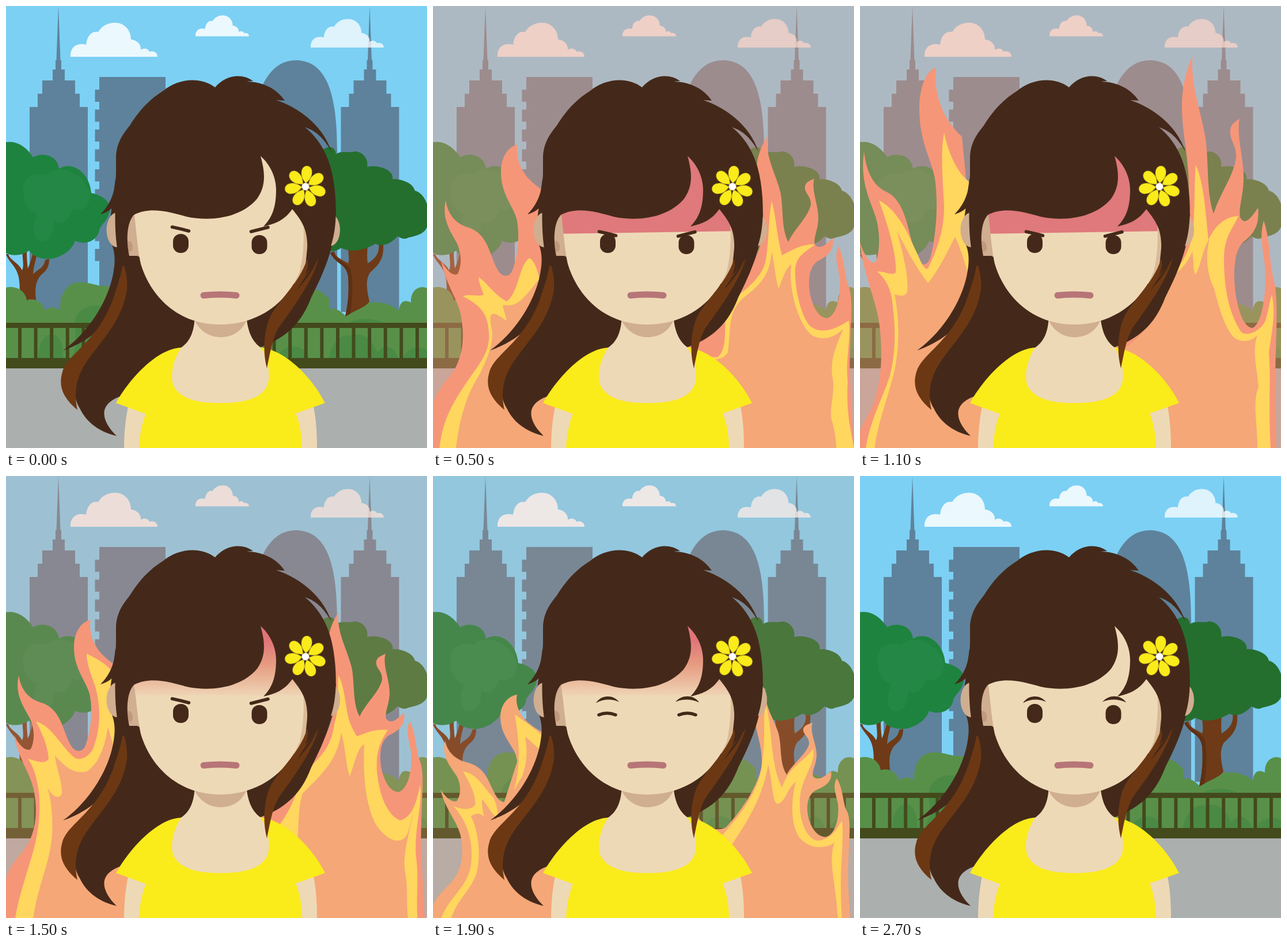
An HTML page without scripts for the animation above (3200 ms loop, 731 by 766 pixels).

```html
<!DOCTYPE html>
<html lang="en">
<head>
<meta charset="utf-8">
<title>Cooling down</title>
<style>
html, body { margin: 0; width: 100%; height: 100%; overflow: hidden; }
svg { display: block; width: 100vw; height: 100vh; }

.hair { fill: #44291a; }
.lock { fill: #6c3813; }
.skin { fill: #eed9b7; }
.shade { fill: #d0ae90; }
.wear { fill: #faeb1b; }
.town { fill: #5e829b; }
.bush { fill: #599049; }
.deep { fill: #4a8a45; }
.rail { fill: #434a1c; }
.wood { fill: #6e3a17; }
.fire { fill: #f69678; }
.y { fill: #ffd65e; }
.o { fill: #f5a777; }
.line { fill: none; stroke: #44291a; stroke-width: 5.5; stroke-linecap: round; }

/* each flame pose shows for 200 ms, starting at --t */
.pose { animation: pose 3.2s step-end infinite; animation-delay: calc(var(--t) * 1ms - 3200ms); }
.tint, .flush, .glow, .frown, .calm, .open, .shut, .lips, .sigh { animation: 3.2s step-end infinite; }
.tint { animation-name: tint; }
.flush { animation-name: flush; }
.glow { animation-name: glow; }
.frown { animation-name: frown; }
.calm { animation-name: calm; }
.open { animation-name: open; }
.shut { animation-name: shut; }
.lips { animation-name: lips; }
.sigh { animation-name: sigh; }

@keyframes pose { 0% { visibility: visible } 6.25%, 100% { visibility: hidden } }
@keyframes tint {
  0% { opacity: 0 } 15.625% { opacity: .42 } 46.875% { opacity: .284 }
  59.375% { opacity: .18 } 71.875% { opacity: .095 } 84.375%, 100% { opacity: 0 }
}
@keyframes flush { 0% { opacity: 0 } 15.625% { opacity: 1 } 46.875%, 100% { opacity: 0 } }
@keyframes glow {
  0% { opacity: 0; transform: none }
  46.875% { opacity: 1; transform: none }
  65.625% { opacity: 1; transform: translateY(-10px) }
  71.875% { opacity: 1; transform: translateY(-22px) }
  78.125% { opacity: 1; transform: translateY(-45px) }
  84.375%, 100% { opacity: 0; transform: none }
}
@keyframes frown {
  0% { opacity: 1; transform: none }
  6.25% { opacity: 1; transform: translateY(4px) }
  9.375% { opacity: 1; transform: translateY(8px) }
  46.875% { opacity: 1; transform: translateY(3px) }
  59.375%, 100% { opacity: 0; transform: none }
}
@keyframes calm { 0% { opacity: 0 } 59.375%, 100% { opacity: 1 } }
@keyframes open { 0% { opacity: 1 } 59.375% { opacity: 0 } 84.375%, 100% { opacity: 1 } }
@keyframes shut { 0% { opacity: 0 } 59.375% { opacity: 1 } 84.375%, 100% { opacity: 0 } }
@keyframes lips { 0% { opacity: 1 } 71.875% { opacity: 0 } 84.375%, 100% { opacity: 1 } }
@keyframes sigh { 0% { opacity: 0 } 71.875% { opacity: 1 } 84.375%, 100% { opacity: 0 } }
</style>
</head>
<body>
<svg viewBox="0 0 731 766" preserveAspectRatio="none">
<defs>
  <path id="cloud" fill="#fff" d="M112 88C111 72 122 63 139 67C141 50 150 43 160 45C167 34 177 29 189 29C206 29 217 42 217 58C228 59 235 67 234 76C240 72 247 74 249 79C257 77 263 81 263 88Z"/>
  <path id="tower" d="M91 0L94.500 94H96V110H102V129H120V152H128V175H142V530H41V175H55V152H63V129H81V110H86V94H87.500Z"/>
  <path id="petal" d="M0-6C-6-12-10-18-9-27C-7-39 7-39 9-27C10-18 6-12 0-6Z"/>
  <pattern id="posts" x="21" width="27.600" height="60" patternUnits="userSpaceOnUse"><rect class="rail" width="6" height="60"/></pattern>
  <linearGradient id="heat" gradientUnits="userSpaceOnUse" x1="0" x2="0" y1="285" y2="380">
    <stop stop-color="#e17579"/><stop offset=".42" stop-color="#e69a80"/><stop offset="1" stop-color="#eed4b4"/>
  </linearGradient>
  <path id="face" d="M222 250V355C227 395 229 425 234 447C250 500 295 552 372 552C440 552 490 512 510 460C517 430 518 400 516 372L500 345V250Z"/>
  <clipPath id="mask"><use href="#face"/></clipPath>

  <!-- flame outlines, left and right -->
  <path id="l" d="M0 790V690C8 660 30 645 40 625C52 600 54 575 50 545C46 510 22 485 14 440C22 458 36 470 43 464C50 450 50 430 42 412C30 390 15 370 22 337C26 362 40 378 62 384C95 395 98 430 111 455C118 470 132 472 138 458C148 430 151 395 145 368C138 345 118 325 118 288C118 262 130 244 147 240C143 262 152 282 164 297C175 308 182 314 192 320L260 790Z"/>
  <path id="r" d="M380 790V560L460 495C470 510 490 535 512 520C535 490 565 440 573 395C578 350 561 320 562 280C563 258 572 240 580 226C577 262 595 290 603 322C609 350 604 385 617 409C628 385 650 368 656 345C657 328 644 325 646 312C648 304 655 303 662 299C656 320 670 345 669 370C668 390 660 402 663 413C672 425 686 410 694 402C698 425 682 435 668 442C652 452 650 480 656 505C662 527 672 541 685 541C702 535 709 500 706 470C703 450 696 435 704 417C716 440 714 470 722 487C730 510 725 545 724 600C722 650 728 700 731 790Z"/>

  <g id="A">
    <use href="#l"/><use href="#r"/>
    <path class="y" d="M10 790C10 720 40 680 60 650C80 620 100 600 97 565C95 535 85 520 52 503C65 498 80 505 88 500C84 490 80 480 79 470C95 480 105 500 128 512C150 495 150 445 168 437C180 445 185 470 190 500L250 790Z"/>
    <path class="o" d="M38 790C42 720 60 670 80 640C95 610 103 590 103 565C95 530 100 525 128 546C125 530 120 522 122 518C150 525 165 495 183 475L260 790Z"/>
    <path class="y" d="M440 790V590C460 600 480 612 495 608C515 590 502 540 512 520C525 500 570 480 578 440C584 400 582 370 588 338C596 365 596 395 606 432C620 425 640 412 663 413C650 425 632 430 629 455C627 490 640 540 655 555C675 570 700 560 722 545C726 580 716 610 720 650C718 700 722 720 731 766V790Z"/>
    <path class="o" d="M440 790V600C470 612 500 620 512 600C518 560 510 530 540 505C565 485 585 470 588 425C592 440 595 475 600 490C608 470 612 455 622 448C616 500 640 560 660 572C685 582 700 570 712 560C700 590 690 610 693 640C700 670 686 700 693 720C700 745 700 760 702 790Z"/>
  </g>
  <g id="B">
    <use href="#l" transform="translate(-15 -253.500) scale(1 1.5)"/>
    <use href="#r" transform="translate(-3 -253.500) scale(1 1.5)"/>
    <path class="y" d="M8 780C15 720 40 680 52 640C65 590 60 540 55 505C50 480 40 470 30 460C45 460 55 468 62 462C65 430 45 370 33 337C60 350 80 385 95 420C105 440 110 458 118 455C135 420 150 380 145 330C143 290 140 250 146 220C155 260 170 290 190 305L260 780Z"/>
    <path class="o" d="M24 780C28 730 45 690 58 640C70 590 68 540 60 500C70 502 78 505 82 495C85 470 75 430 64 390C80 420 95 450 118 480C135 460 150 430 165 400C175 420 180 440 190 470L260 780Z"/>
    <path class="y" d="M480 780L500 600L545 462C560 445 575 420 578 390C582 350 580 310 583 275C598 310 600 360 605 405C615 385 630 365 657 364C645 390 632 400 632 440C632 500 645 540 662 565C675 575 698 560 704 545C710 525 712 510 715 500C722 530 716 560 710 600C714 650 708 700 714 780Z"/>
    <path class="o" d="M440 780V600C490 590 520 520 543 468C560 455 572 440 577 425C580 440 578 462 583 465C592 450 595 420 607 403C598 440 605 470 615 490C625 530 635 560 650 575C665 585 682 580 690 570C680 600 690 630 692 660C680 690 692 730 690 780Z"/>
  </g>
  <g id="C">
    <use href="#l" y="9"/>
    <use href="#r" transform="translate(-3 12) scale(1 .99)"/>
    <path class="y" d="M14 780C20 730 40 680 50 640C60 600 60 560 55 535C50 510 45 500 38 490C55 495 68 500 74 490C72 465 62 445 52 425C80 435 90 460 115 485C125 495 140 490 150 475C165 440 165 400 155 365C148 345 140 325 140 308C155 315 175 325 190 345L260 780Z"/>
    <path class="o" d="M46 780C50 720 78 670 80 620C82 590 78 560 72 540C80 555 92 562 97 550C98 530 88 510 85 485C100 500 115 518 140 512C160 500 172 470 177 435L190 480L260 780Z"/>
    <path class="y" d="M440 780V640C490 600 500 560 520 510C545 490 565 470 570 430C580 400 575 370 577 345C590 370 588 400 598 430C605 445 610 455 612 450C625 445 640 438 663 440C650 460 640 480 645 520C650 560 665 590 685 597C705 590 712 570 719 535C724 570 708 610 712 660C718 700 710 740 716 780Z"/>
    <path class="o" d="M440 780V640L503 660C510 620 505 580 515 550C545 520 575 495 582 445C590 470 590 505 597 520C605 500 610 470 622 465C620 510 622 560 640 600C655 625 675 637 688 630C700 625 702 600 708 580C700 620 690 650 692 680C700 720 693 740 700 780Z"/>
  </g>
  <g id="D">
    <use href="#l" transform="translate(-1 182) scale(1 .82)"/>
    <use href="#r" transform="translate(-3 182) scale(1 .82)"/>
    <path class="o" d="M28 780C80 700 80 640 70 588L114 595L160 452L250 780ZM500 780L518 640L582 500L597 568L630 530C620 600 640 650 697 635L705 780Z"/>
    <path class="y" d="M10 780C20 735 55 720 65 680C72 640 62 600 35 572C50 578 65 580 73 570C75 550 62 530 52 512C75 515 85 535 100 552C110 560 112 580 114 595C100 585 95 570 85 560C85 575 88 590 90 592C82 582 72 585 66 590C82 620 82 670 75 690C65 720 35 740 28 780ZM142 413C165 430 180 440 190 450V478C175 465 165 455 160 452C165 480 162 500 155 520L140 545C155 500 148 450 142 413Z"/>
    <path class="y" d="M578 395C590 440 585 500 606 540C620 500 640 500 660 473C665 500 640 520 637 560C635 600 650 630 668 632C690 630 700 615 710 597C715 640 703 680 711 780H704C700 700 685 670 697 635C685 645 655 650 635 625C620 600 622 560 630 530C615 540 612 568 597 568C588 560 590 530 582 500C575 540 560 580 518 640L500 625C540 580 570 540 572 490C578 450 572 420 578 395Z"/>
  </g>
</defs>

<!-- park -->
<rect width="731" height="766" fill="#7cd0f4"/>
<g class="town">
  <use href="#tower"/><use href="#tower" x="540.500"/>
  <path d="M162 123H277V530H162ZM430 530V190C440 130 465 94 503 94C560 94 575 160 575 250V530Z"/>
  <path d="M158.500 145V443" stroke="#5e829b" stroke-width="8" stroke-dasharray="21 13.500"/>
</g>
<use href="#cloud" opacity=".85"/>
<use href="#cloud" opacity=".85" transform="translate(260 -1.700) scale(.616)"/>
<use href="#cloud" opacity=".75" transform="translate(435 -1.900) scale(.84)"/>
<path class="wood" d="M0 430C5 445 18 450 22 470C26 490 22 510 20 520H54C50 500 50 485 55 475C62 460 75 462 75 438L68 440C66 455 52 458 47 465C48 450 53 435 56 424L50 418C45 435 42 445 38 455C36 440 36 430 36 416H28C28 436 32 450 28 458C22 445 6 440 4 430Z"/>
<path fill="#1e833f" d="M0 236C17 233 35 243 47 262C65 252 90 260 92 282C115 268 145 288 148 324C168 328 183 340 180 354C178 372 165 378 162 388C160 405 140 416 120 407C115 425 88 441 68 438C55 437 46 432 40 424C27 434 8 433 0 428Z"/>
<path fill="#258746" d="M30 320C28 298 50 285 70 293C90 270 138 290 146 326C146 348 130 358 115 352C108 375 92 380 84 372C84 400 70 412 56 406C42 395 50 375 54 360C38 356 30 340 30 320Z"/>
<path class="bush" d="M0 488C18 484 34 494 36 510C50 505 64 513 68 528C75 520 88 522 94 528C92 498 108 479 127 479C148 478 160 487 172 485L250 500H480C500 484 540 480 561 508V525C570 522 582 528 590 538C598 524 615 514 632 514C652 512 672 518 682 528C684 512 692 508 703 514C702 492 718 483 731 489V620H0Z"/>
<path class="wood" d="M563 428C575 450 590 445 594 468C596 495 594 515 589 538C605 528 625 522 631 512C626 490 624 475 632 462C645 450 657 440 655 413H647C650 432 635 442 628 446C626 432 628 420 628 410H593C594 425 597 440 594 446C585 440 572 436 570 425Z"/>
<path fill="#5e3014" d="M563 428C575 450 590 445 594 468C596 495 594 515 589 538L598 533C602 505 603 475 598 455C590 445 572 440 567 426Z"/>
<path fill="#246f2e" d="M540 260C555 238 572 242 573 257C582 249 598 256 605 252C620 252 630 266 627 279C645 274 675 284 671 300C685 299 707 306 710 320C722 323 731 337 733 352V375C731 396 712 398 697 402C692 405 686 403 680 399C668 412 655 418 641 412C622 424 598 428 582 419C574 426 562 427 540 420Z"/>
<g class="deep">
  <path d="M119 550C120 528 145 512 172 522V612H125ZM57 612C55 585 66 568 80 569C95 570 100 590 99 612ZM115 612C118 582 135 572 155 578V612ZM470 612C480 580 522 585 526 612ZM560 612C565 580 585 566 600 572C625 560 640 590 645 600C658 582 678 592 680 612ZM688 612C695 592 715 588 731 596V612ZM596 549C606 540 640 540 655 549Z"/>
</g>
<rect y="628" width="731" height="138" fill="#abafae"/>
<rect class="rail" y="549" width="731" height="9"/>
<rect class="rail" y="610" width="731" height="18"/>
<rect y="556" width="731" height="56" fill="url(#posts)"/>
<rect class="tint" width="731" height="766" fill="#f0997d"/>

<!-- flames -->
<g class="fire">
  <g class="pose" style="--t:500"><use href="#A"/></g>
  <g class="pose" style="--t:700"><use href="#B"/></g>
  <g class="pose" style="--t:900"><use href="#A" transform="translate(0 -257) scale(1 1.5)"/></g>
  <g class="pose" style="--t:1100"><use href="#B"/></g>
  <g class="pose" style="--t:1300"><use href="#A" transform="translate(0 -257) scale(1 1.5)"/></g>
  <g class="pose" style="--t:1500"><use href="#C"/></g>
  <g class="pose" style="--t:1700"><use href="#A" y="7"/></g>
  <g class="pose" style="--t:1900" fill="#f5a777"><use href="#D"/></g>
  <g class="pose" style="--t:2100" fill="#f5a777"><use href="#A" transform="translate(-2 182) scale(1 .82)"/></g>
  <g class="pose" style="--t:2300" fill="#f29b71"><use href="#D" y="97"/></g>
  <g class="pose" style="--t:2500" fill="#f29b71"><use href="#A" transform="translate(-3 279) scale(1 .82)"/></g>
</g>

<!-- girl -->
<path class="hair" d="M177 400C190 420 190 440 187 458C181 503 148 562 99 597C125 588 145 575 160 562L140 605C115 640 114 675 128 697C140 723 165 739 192 745C168 722 155 690 203 675L300 640L440 592C490 575 515 545 530 505C550 465 572 420 573 360L480 300H190Z"/>
<path class="lock" d="M203 445C209 460 211 475 210 490C203 545 165 580 141 615C120 645 118 672 124 700C100 680 90 660 98 634C108 600 165 580 190 495C197 475 201 460 203 445Z"/>
<g class="shade">
  <ellipse cx="193" cy="388" rx="18.500" ry="30"/><ellipse cx="563" cy="388" rx="17" ry="28"/>
  <path d="M207 370L225 350L242 440L228 433H212Z"/>
</g>
<path fill="#c09a7b" d="M210 407C218 406 222 414 219 424L211 428Z"/>
<path fill="#dabb98" d="M500 340L524 370V410L520 450L500 490Z"/>
<path class="skin" d="M213 690C207 715 205 745 205 766H235L245 705ZM533 690C539 715 540 745 540 766H510L500 705Z"/>
<path class="wear" d="M304 592C262 594 215 645 191 688L243 707C236 722 232 745 231 766H514C514 745 510 722 503 706L554 688C535 650 490 597 440 591Z"/>
<path class="skin" d="M328 530C328 560 322 580 304 592C285 622 286 650 292 660C305 682 335 688 372 688C420 688 450 678 456 650C458 630 455 610 441 591C426 580 418 560 417 530Z"/>
<path class="shade" d="M328 535V546C338 565 355 574 372 574C392 574 408 565 417 546V535Z"/>
<use class="skin" href="#face"/>
<g clip-path="url(#mask)">
  <path class="flush" fill="#df797b" d="M210 240H530V390L210 395Z"/>
  <rect class="glow" x="210" y="150" width="310" height="230" fill="url(#heat)"/>
</g>
<g class="open hair">
  <rect x="290" y="395" width="27" height="33" rx="13"/>
  <rect x="426.500" y="397" width="27" height="33" rx="13"/>
</g>
<path class="shut line" stroke-width="5" d="M288 414Q302 408 317 414M427 414Q442 408 456 414"/>
<path class="lips" fill="none" stroke="#b77577" stroke-width="11" stroke-linecap="round" d="M343 501.500Q372 498.500 400 501.500"/>
<ellipse class="sigh" cx="370.500" cy="498" rx="14.500" ry="18" fill="#b77577"/>
<path class="hair" d="M164 361C180 345 190 325 191 290V262C192 235 205 220 215 207C235 175 255 158 273 147C295 128 335 120 363 141C380 121 408 115 429 130L418 131C445 131 470 143 484 164L469 163C505 175 549 204 565 252C552 230 540 217 519 210C550 235 564 270 569 305C575 345 574 385 565 413C555 445 535 485 505 520C520 490 525 450 523 410C522 385 512 370 497 352C484 371 467 378 447 382C464 365 469 345 469 318C469 297 459 275 442 260C452 295 449 315 436 334C410 365 360 375 313 365C285 357 250 347 222 362C210 375 208 405 214 433L212 450H200C192 425 188 390 190 344C184 352 175 358 164 361Z"/>
<path class="frown line" d="M288.500 383Q303 386 317.500 390M425.500 391Q441 387 455 383.500"/>
<path class="calm hair" d="M283 393.500C292 378.500 313 378.500 323 391.500C311 386 296 386 283 393.500ZM421 391.500C432 378.500 453 378.500 462 392.500C449 386 433 386 421 391.500Z"/>
<path class="lock" d="M543 437C535 470 505 515 475 555C462 575 458 605 453 628C447 605 446 575 456 545C470 510 508 485 523 438C526 450 523 458 519 466C530 456 537 448 543 437Z"/>
<path class="hair" d="M538 446C528 468 515 480 505 493C515 475 525 460 538 446Z"/>
<g class="wear" transform="translate(520 313) rotate(5)">
  <use href="#petal"/>
  <use href="#petal" transform="rotate(51.430)"/>
  <use href="#petal" transform="rotate(102.860)"/>
  <use href="#petal" transform="rotate(154.290)"/>
  <use href="#petal" transform="rotate(205.710)"/>
  <use href="#petal" transform="rotate(257.140)"/>
  <use href="#petal" transform="rotate(308.570)"/>
  <circle r="6.500" fill="#fff"/>
</g>
</svg>
</body>
</html>
```
